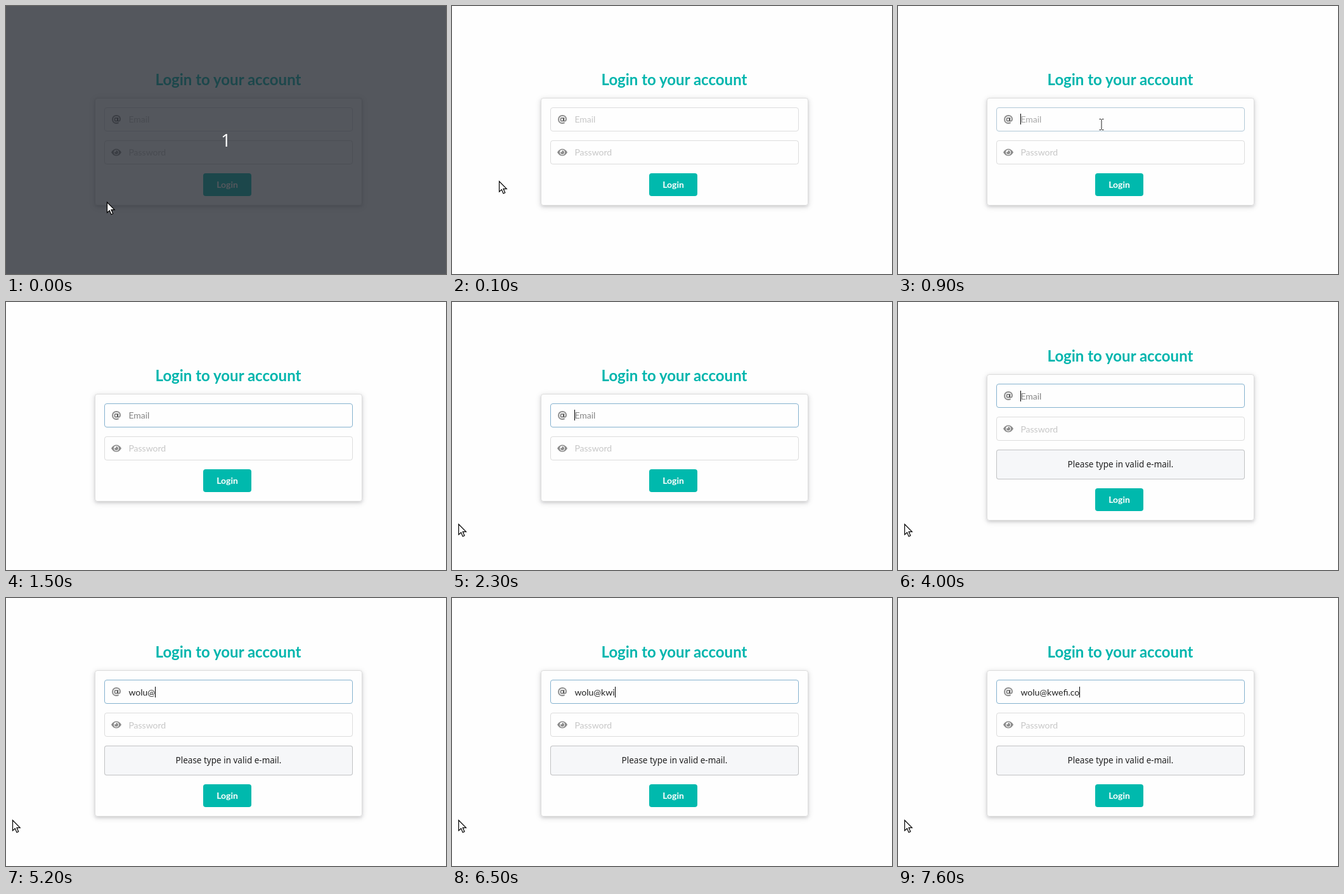
These frames come from a looping animation (694x423 px, 8000 ms). An HTML page:

```html
<!DOCTYPE html>
<html lang="en">
<head>
<meta charset="utf-8">
<title>Login form</title>
<style>
  html, body { margin: 0; width: 100%; height: 100%; overflow: hidden; background: #fefefe; }
  #stage {
    --up: 0px; --textUp: 0px; --down: 0px;
    position: relative; width: 694px; height: 423px; overflow: hidden;
    background: #fefefe; color: rgba(0, 0, 0, .87);
    font: 14px/17px Lato, sans-serif;
  }
  #stage.error { --up: -31px; --textUp: -30px; --down: 30px; }
  #stage * { position: absolute; box-sizing: border-box; white-space: pre; }

  h2 {
    left: 140px; top: calc(100px + var(--up)); width: 421px; margin: 0;
    font-size: 24px; line-height: 31px; font-weight: 700;
    text-align: center; color: #00b5ad;
  }
  .panel {
    left: 140px; top: calc(145px + var(--up)); width: 422px; height: 170px;
    border: 1px solid rgba(34, 36, 38, .15); border-radius: 4px;
    box-shadow: 0 2px 4px rgba(34, 36, 38, .12), 0 2px 10px rgba(34, 36, 38, .15);
  }
  .error .panel { height: 231px; }
  .field {
    left: 155px; width: 392px; height: 38px;
    border: 1px solid rgba(34, 36, 38, .15); border-radius: 4px;
  }
  #email { top: calc(160px + var(--up)); }
  #password { top: calc(212px + var(--up)); }
  .label { left: 193.4px; color: rgba(191, 191, 191, .87); }
  .first { top: calc(170px + var(--textUp)); }
  .second { top: calc(222px + var(--textUp)); }
  .entry { left: 193.4px; height: 17px; }
  #stage .entry span { position: static; }
  #stage #caret { left: 100%; top: 0; width: 1px; height: 17px; background: #000; }
  .icon { left: 166px; width: 16px; height: 16px; overflow: visible; color: rgba(0, 0, 0, .45); }
  .at { top: calc(171px + var(--up)); }
  .eye { top: calc(223px + var(--up)); }
  .message {
    display: none; left: 155px; top: 233px; width: 392px; height: 47px;
    border: 1px solid rgba(34, 36, 38, .25); border-radius: 4px;
    background: #f6f7f9; text-align: center;
    font: 13.5px/44px "Noto Sans", "Open Sans", sans-serif;
  }
  .error .message { display: block; }
  .button {
    left: 311px; top: calc(264px + var(--down)); width: 76px; height: 36px;
    border-radius: 4px; background: #00b9ad; color: #fff;
    font-weight: 700; line-height: 36px; text-align: center;
  }
  #shade {
    inset: 0; background: rgba(36, 40, 48, .78); color: #fff;
    font: 28px/38px "Open Sans", "Noto Sans", sans-serif;
    text-align: center; padding-top: 192px;
  }
  .pointer { left: 0; top: 0; width: 1px; height: 1px; overflow: visible; }
</style>
</head>
<body>
<div id="stage">
  <h2>Login to your account</h2>
  <div class="panel"></div>

  <div class="field" id="email"></div>
  <svg class="icon at" viewBox="0 0 16 16" fill="none" stroke="currentColor" stroke-width="1.9">
    <circle cx="7.7" cy="8.2" r="2.4"/>
    <path d="M10.6 5L10.2 8.6Q10 10.6 11.7 10.6Q14 10.4 14 7.4C14 4.1 11.6 2 8.2 2C4.4 2 2 4.7 2 8C2 11.600 4.600 14 8 14Q10 14 11.600 13.100"/>
  </svg>
  <div class="label first" id="hint">Email</div>
  <div class="entry first"><span id="typed"></span><div id="caret"></div></div>

  <div class="field" id="password"></div>
  <svg class="icon eye" viewBox="0 0 16 16" fill="currentColor" fill-rule="evenodd">
    <path d="M0 8Q3 2.500 8 2.500Q13 2.500 16 8Q13 13.500 8 13.500Q3 13.500 0 8ZM4 8a4 4 0 1 0 8 0a4 4 0 1 0 -8 0ZM5 8a3 3 0 1 0 6 0a3 3 0 0 0 -3.700 -2.900a1.400 1.400 0 0 1 -2 2Z"/>
  </svg>
  <div class="label second">Password</div>

  <div class="message">Please type in valid e-mail.</div>
  <div class="button">Login</div>
  <div id="shade">1</div>

  <svg class="pointer" id="arrow">
    <path d="M.5 .8V17.200L4.300 13.700L7 20L9.700 18.800L7 12.600H12.200Z" fill="#fff" stroke="#000" stroke-width="1.200"/>
  </svg>
  <svg class="pointer" id="beam">
    <path d="M-3.500 -8.500H-1L0 -7.500L1 -8.500H3.500M0 -7.500V7.500M-3.500 8.500H-1L0 7.500L1 8.500H3.500" fill="none" stroke="#222"/>
  </svg>
</div>

<script>
  const LOOP = 8000, STEP = 100;
  const $ = id => document.getElementById(id);
  const stage = $('stage');

  // Each row: time, x, y
  const path = [
    [0, 159, 309], [100, 74, 276], [200, 172, 226], [300, 276, 176],
    [400, 331, 140], [500, 331, 140], [600, 325, 168], [700, 321, 187],
    [1000, 321, 187], [1100, 250, 325], [1700, 10, 349], [1800, 10, 350]
  ];

  // Each row: time, text in the email field
  const typing = [
    [0, ''], [2500, 'w'], [2700, 'wo'], [2800, 'wol'], [2900, 'wolu'],
    [4000, ''], [4400, 'wo'], [4600, 'wol'], [5000, 'wolu'], [5200, 'wolu@'],
    [6100, 'wolu@k'], [6200, 'wolu@kw'], [6500, 'wolu@kwi'],
    [6800, 'wolu@kw'], [6900, 'wolu@kwe'], [7100, 'wolu@kwef'],
    [7400, 'wolu@kwefi.'], [7500, 'wolu@kwefi.c'], [7600, 'wolu@kwefi.co']
  ];

  const caretSpans = [[900, 1500], [2300, 4200], [4400, 5800], [6100, LOOP]];

  const within = (t, a, b) => t >= a && t < b;
  const latest = (rows, t) => rows.filter(r => r[0] <= t).pop();
  const show = (el, on) => { el.style.visibility = on ? 'visible' : 'hidden'; };
  const mix = (a, b, k) => `rgb(${a.map((v, i) => Math.round(v + (b[i] - v) * k))})`;

  function pointerAt(t) {
    const a = latest(path, t);
    const b = path[path.indexOf(a) + 1];
    if (!b || a[0] >= 1100) return [a[1], a[2]];
    const k = (t - a[0]) / (b[0] - a[0]);
    return [a[1] + (b[1] - a[1]) * k, a[2] + (b[2] - a[2]) * k];
  }

  function drawPointer(t) {
    const [x, y] = pointerAt(t);
    const visible = !within(t, 1200, 1700);
    const overField = within(x, 155, 547) && (within(y, 160, 198) || within(y, 212, 250));
    for (const id of ['arrow', 'beam']) {
      $(id).style.transform = `translate(${Math.round(x)}px, ${Math.round(y)}px)`;
      show($(id), visible && overField === (id === 'beam'));
    }
  }

  function draw(t) {
    const text = latest(typing, t)[1];
    const focus = Math.min(1, Math.max(0, (t - 800) / 200));
    stage.className = t >= 4000 ? 'error' : '';
    show($('shade'), t < 100);
    $('typed').textContent = text;
    show($('hint'), !text);
    show($('caret'), caretSpans.some(([a, b]) => within(t, a, b)));
    $('email').style.borderColor = mix([221, 221, 222], [133, 178, 207], focus);
    $('hint').style.color = mix([199, 199, 199], [133, 133, 133], focus);
    drawPointer(t);
  }

  const start = performance.now();
  function tick() {
    const t = (performance.now() - start) % LOOP;
    draw(Math.floor(t / STEP) * STEP);
    requestAnimationFrame(tick);
  }
  draw(0);
  requestAnimationFrame(tick);
</script>
</body>
</html>
```
